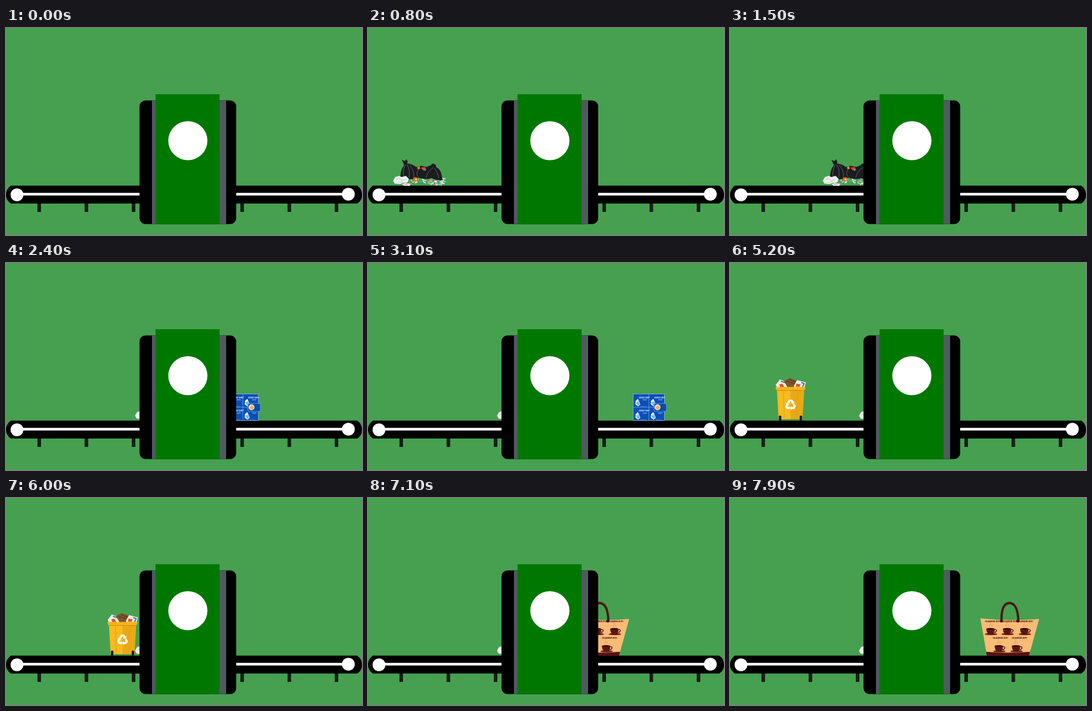
Write an HTML page that moves like this. It is 600 px wide and 350 px high and loops after 8 s.

```html
<!DOCTYPE html>
<html lang="en">
<head>
<meta charset="utf-8">
<title>Recycling machine</title>
<style>
  html, body { margin: 0; width: 100%; height: 100%; overflow: hidden; background: #46a050; }
  svg { display: block; width: 100vw; height: 100vh; }
  text { font-family: "Open Sans", "Noto Sans", sans-serif; font-weight: 700; }
</style>
</head>
<body>
<svg viewBox="0 0 600 350">
  <defs>
    <g id="cup">
      <ellipse cy="4.4" rx="10.5" ry="1.7" fill="#8c2a20"/>
      <ellipse cy="3.7" rx="9.5" ry="1.1" fill="#4a1010"/>
      <path d="M-8-5H6Q6 3 2 4H-4Q-8 2-8-5Z" fill="#5a1714"/>
      <path d="M6-3.5Q10-4 9-1Q8 1.5 4.5 1.5" fill="none" stroke="#5a1714" stroke-width="1.4"/>
      <ellipse cx="-1" cy="-5" rx="7" ry="1.2" fill="#2c0808"/>
      <path d="M-2-8q-2-2 0-4t0-4M2-8q-2-2 0-4" fill="none" stroke="#a9663f" stroke-width=".7" stroke-dasharray="1 1"/>
    </g>
    <g id="pack">
      <path d="M4 11L8 7.500L12 17L8.500 20.500L3.500 17Z" fill="#e4f2fb"/>
      <path d="M4.500 14L9 12L11 17L8 19Z" fill="#6cb5e8"/>
      <text x="9.500" y="6.700" font-size="3.900" font-style="italic" fill="#fff">SUSU UHT</text>
      <path d="M16 9.300h7" stroke="#9cc7f2" stroke-width="1"/>
      <path d="M12 20.500h10" stroke="#6fa3de" stroke-width=".7" stroke-dasharray="2 .6"/>
    </g>
    <path id="arrow" d="M-5.500-4.600L-2.700-9H2.700L5-5.400L6.800-6.400L5.200-1.700L.3-2.800L2-3.800L.5-6.200L-2.500-2.800Z"/>
  </defs>

  <rect width="600" height="350" fill="#46a050"/>
  <g id="legs" fill="#161c17"></g>
  <path d="M8 266.500H592Q600 272 600 282T592 296.700H8Q0 291 0 282T8 266.500Z"/>
  <path d="M18 281H577" stroke="#fff" stroke-width="4.400"/>
  <circle cx="18.500" cy="282" r="10.800" fill="#fff"/>
  <circle cx="577" cy="281" r="10.800" fill="#fff"/>

  <g id="trash">
    <g id="scraps"></g>
    <path d="M169 254Q168 243 173 235Q176 232 174 229L171 223L176 225L179 222L181 226L180 229Q189 230 195 235L204 233L213 235L220 232L223 229L228 231L229 235Q237 240 238 248L240 257Q229 258 221 254Q211 257 200 253Q186 258 169 254Z" fill="#1b1c1e"/>
    <path d="M177 231Q172 243 174 252M180 231Q186 241 183 253M184 232Q193 241 191 252M199 239Q194 246 199 252M224 236Q214 243 212 253M226 237Q233 246 233 254" fill="none" stroke="#5d5f63" stroke-width="1"/>
    <path d="M203 236l7-1 3 5-6 1z" fill="#d4482e"/>
    <path d="M207 237l5 3-2 2z" fill="#4a8fd4"/>
    <path d="M197 235l4-1 1 4-4 1z" fill="#e58b2b"/>
    <path d="M190 253l6-1 3 6-7 2z" fill="#e9612a"/>
    <path d="M193 255l3-1 1 3-3 1z" fill="#f7d246"/>
    <path d="M156.500 258L160 252L166 250L171 252L178 250L183 255L181 261L173 262L168 264L159 263Z" fill="#eef1ed"/>
    <path d="M161 257l6-3 4 4 7-3M164 261l9-1" fill="none" stroke="#bfc8c0" stroke-width="1"/>
    <path d="M171 264l6-2 9 2-2 3-9 0z" fill="#f1e4e6"/>
    <path d="M175 265h6" stroke="#c98691" stroke-width="1"/>
  </g>

  <g id="wallet">
    <rect x="447" y="221.500" width="52.500" height="45" fill="#0a4fb8" stroke="#83b4e6" stroke-width=".8"/>
    <path d="M473.300 222V266M447 244H499" stroke="#6ea6e2" stroke-width=".8"/>
    <use href="#pack" x="447" y="222"/><use href="#pack" x="473" y="222"/>
    <use href="#pack" x="447" y="244.500"/><use href="#pack" x="473" y="244.500"/>
    <rect x="482" y="237.500" width="21" height="13.500" rx="3" fill="#0a49ad" stroke="#7fb0e2" stroke-width=".7"/>
    <circle cx="488" cy="244" r="5" fill="#f6dfc0"/>
    <circle cx="488.500" cy="244.500" r="3" fill="#efa653"/>
  </g>

  <g id="bin">
    <path d="M77 206L84 197L103 204L101 213H80Z" fill="#f1efe8"/>
    <path d="M83 205l5-1 4 6-7 1z" fill="#e2542c"/>
    <path d="M86 200l12 4" stroke="#4677a8" stroke-width="2"/>
    <path d="M91 200L100 194.500L117 200L111 212H98Z" fill="#80552c"/>
    <path d="M95 200l16 5M100 197l12 5" stroke="#4e321a" stroke-width="1.500" stroke-dasharray="2 1"/>
    <path d="M108 207L113 198L128 202L125 212H108Z" fill="#f3f1ea"/>
    <path d="M112 204l7 1-2 5-6-1z" fill="#e2542c"/>
    <path d="M120 202l5 2-3 6" fill="none" stroke="#4677a8" stroke-width="2"/>
    <path d="M79 213H125L122 264H82Z" fill="#f8ba20"/>
    <path d="M102 213H125L122 264H102Z" fill="#e9a916"/>
    <path d="M77 209.500H127V213Q126 215.500 123 215.500H81Q78 215.500 77 213Z" fill="#f6b51b"/>
    <path d="M79 215.500H125" stroke="#c98c10" stroke-width="1"/>
    <path d="M90 217l1.500 45M114 217l-1.500 45" stroke="#dda018" stroke-width="1"/>
    <rect x="82.500" y="258" width="4" height="8.500" rx="1.500" fill="#191a18"/>
    <rect x="117.500" y="258" width="4" height="8.500" rx="1.500" fill="#191a18"/>
    <g transform="translate(102 240)" fill="#fff">
      <use href="#arrow"/><use href="#arrow" transform="rotate(120)"/><use href="#arrow" transform="rotate(240)"/>
    </g>
  </g>

  <g id="bag">
    <path d="M422 203.500Q471 209 521 204.500L504 266.500H433Z" fill="#f9bb76"/>
    <path d="M431.500 260Q468 263 505.500 260L504 267H433Z" fill="#541312"/>
    <path d="M457.500 208Q457 178 471 177.500Q485 178 486 208" fill="none" stroke="#4d1512" stroke-width="3.800"/>
    <circle cx="457.500" cy="208" r="2.500" fill="#391010"/><circle cx="485" cy="208" r="2.500" fill="#391010"/>
    <g id="labels" font-size="3.200" fill="#35100d"></g>
    <g id="cups"></g>
  </g>

  <rect x="225" y="122.500" width="163" height="209" rx="10"/>
  <path d="M246 122.500h6v209h-6zM360 122.500h11v209h-11z" fill="#4f5a5f"/>
  <rect x="252" y="112" width="108" height="219.500" fill="#007800"/>
  <circle cx="306.500" cy="190.500" r="33" fill="#fff"/>
</svg>
<script>
const LOOP = 8000, STEP = 100;
const get = id => document.getElementById(id);
const clamp = (v, lo, hi) => Math.min(hi, Math.max(lo, v));
const ramp = (t, start, length) => clamp((t - start) / length, 0, 1);

get('legs').innerHTML = [53, 132.5, 212, 395, 474.5, 554]
  .map(x => `<rect x="${x}" y="296" width="6" height="15"/>`).join('');

get('cups').innerHTML = [[440, 226], [468, 226], [497, 226], [454, 255], [483, 255]]
  .map(([x, y]) => `<use href="#cup" x="${x}" y="${y}"/>`).join('');

get('labels').innerHTML = [[430, 209.5], [459, 209.5], [485, 209.5], [443, 238.3], [475, 238.3]]
  .map(([x, y]) => `<text x="${x}" y="${y}">SELAMBUR KOPI</text>`).join('');

// Loose bottles and wrappers under the sacks
let seed = 7;
const random = () => (seed = seed * 16807 % 2147483647) / 2147483647;
const tints = ['#b9dfe4', '#7cc0d8', '#e7efe9', '#3d9d63', '#a9d8c4', '#d8764c', '#dbe9e4'];
get('scraps').innerHTML = Array.from({ length: 70 }, (_, i) => {
  const x = 181 + random() * 60, y = 253 + random() * 11;
  return `<rect x="${x}" y="${y}" width="${2 + random() * 4}" height="1.8" fill="${tints[i % tints.length]}" transform="rotate(${random() * 70 - 35} ${x} ${y})"/>`;
}).join('');

// Slides an item by dx and scales it about the point (cx, cy)
function place(id, dx, scale, cx, cy) {
  const item = get(id);
  item.style.display = scale > 0 ? '' : 'none';
  item.setAttribute('transform',
    `translate(${cx + dx} ${cy}) scale(${scale}) translate(${-cx} ${-cy})`);
}

function render(t) {
  place('trash', clamp((t - 1500) * 0.163, -156, 61), ramp(t, 50, 500), 201, 244);

  const walletScale = t < 1900 ? 0 : 1 - ramp(t, 4000, 500);
  place('wallet', clamp((t - 3100) * 0.106, -140, 92), walletScale, 475, 238);

  const binScale = t > 6700 ? 0 : ramp(t, 4060, 500);
  place('bin', Math.max(-69, (t - 5200) * 0.118), binScale, 102, 231);

  place('bag', (t - 7900) * 0.101, t < 6500 ? 0 : 1, 471, 222);
}

const start = performance.now();
function tick() {
  const t = (performance.now() - start) % LOOP;
  render(Math.floor(t / STEP) * STEP);
  requestAnimationFrame(tick);
}
tick();
</script>
</body>
</html>
```
